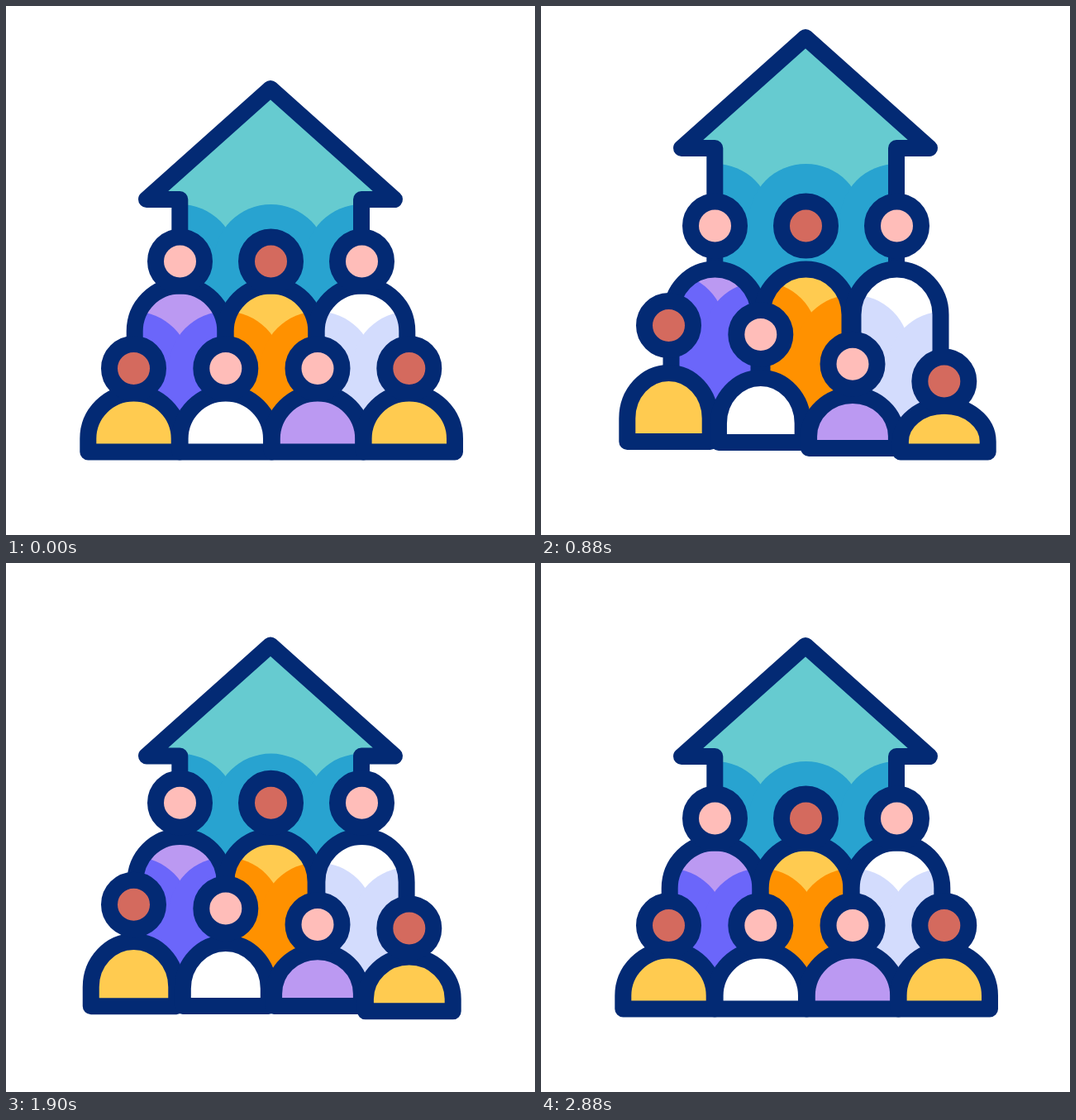
Write an HTML page with a canvas that moves like this. It is 640 by 640 pixels and loops after 3.6 s.

```html
<!DOCTYPE html>
<html lang="en">
<head>
<meta charset="utf-8">
<title>Growing community</title>
<style>
  html, body { margin: 0; width: 100%; height: 100%; overflow: hidden; background: #fff; }
  canvas { display: block; }
</style>
</head>
<body>
<canvas id="stage" width="640" height="640"></canvas>
<script>
const ctx = document.getElementById('stage').getContext('2d');
const LOOP = 3600, STAGGER = 140;
const INK = '#032a74', PINK = '#ffbdb9', BROWN = '#d46a5e', YELLOW = '#ffcb50', LILAC = '#bb99f2';

// Vertical offsets from the resting pose: [time, ...offsets]
const ARROW = [[0, 0], [460, 22], [520, 24], [880, -62], [970, -64], [1200, -57], [1600, 26], [2190, -25.5], [2880, 0]];

// time, head, body top, shade
const BACK = [
  [0, 0, 0, 0], [480, 15.5, 15.3, 12.5], [880, -43, -20, -49], [1040, -48, -22.5, -51], [1200, -45, -21, -45.5],
  [1600, 9, 10.5, -2], [1960, -21, -9, -10], [2220, -1, -0.5, 0], [2520, 0, 0, 0]
];

// time, head, body top, body base, shade
const FRONT = [
  [0, 0, 0, 0, 0], [180, 5, 5, 0, 0], [320, 11, 10.5, 0, 0], [470, 15.6, 15.3, 0, 0],
  [600, -5, 2.5, -4.5, -20], [740, -41, -18.5, -11.5, -36], [880, -52, -24.5, -12.6, -46],
  [1040, -55.5, -25.6, -12.8, -50], [1200, -50, -23, -12, -45], [1320, -36.5, -15.5, -7.5, -35],
  [1460, -0.5, 5.5, 2, -3], [1530, 9, 12, 4, 0], [1600, 1.5, 3.5, -3.5, -6],
  [1800, -23, -9.5, -3.5, -14], [1940, -25.5, -10.5, -3, -14], [2080, -19.5, -6.5, -0.5, -7],
  [2220, 2.5, 4.5, 0, 0], [2460, 0, 0, 0, 0]
];

const backRow = [
  { x: 210.5, skin: PINK, shirt: LILAC, dark: '#6b66fa' },
  { x: 320.5, skin: BROWN, shirt: YELLOW, dark: '#ff9100' },
  { x: 430.5, skin: PINK, shirt: '#fff', dark: '#d3dcfd' }
];
const frontRow = [
  { x: 154.5, skin: BROWN, shirt: YELLOW },
  { x: 265.8, skin: PINK, shirt: '#fff' },
  { x: 377, skin: PINK, shirt: LILAC },
  { x: 487.8, skin: BROWN, shirt: YELLOW }
];

// Monotone cubic interpolation: eases to a stop at every extreme
function sample(keys, time) {
  const last = keys.length - 1;
  const t = Math.max(0, Math.min(time, keys[last][0]));
  let i = 0;
  while (i < last - 1 && t > keys[i + 1][0]) i++;
  const span = keys[i + 1][0] - keys[i][0], u = (t - keys[i][0]) / span;
  return keys[i].slice(1).map((from, n) => {
    const c = n + 1, to = keys[i + 1][c];
    const secant = k => (keys[k + 1][c] - keys[k][c]) / (keys[k + 1][0] - keys[k][0]);
    const slope = k => {
      if (k === 0 || k === last) return 0;
      const a = secant(k - 1), b = secant(k);
      return a * b > 0 ? 2 * a * b / (a + b) : 0;
    };
    const v = 1 - u;
    return v * v * (1 + 2 * u) * from + u * u * (3 - 2 * u) * to
      + span * u * v * (v * slope(i) - u * slope(i + 1));
  });
}

function paint(path, color, outline = path) {
  ctx.fillStyle = color;
  ctx.fill(path);
  ctx.stroke(outline);
}

function drawHead(x, y, skin) {
  const path = new Path2D();
  path.arc(x, y, 29.5, 0, 7);
  paint(path, skin);
}

function bodyPath(x, half, top, base, rise) {
  const path = new Path2D();
  path.moveTo(x - half, base);
  path.ellipse(x, top + rise, half, rise, 0, Math.PI, 2 * Math.PI);
  path.lineTo(x + half, base);
  return path;
}

// Darker tone cast around the row of heads in front
function shade(shape, color, centers) {
  ctx.save();
  ctx.clip(shape);
  ctx.fillStyle = color;
  for (const [x, y] of centers) {
    ctx.beginPath();
    ctx.arc(x, y, 69, Math.PI, 2 * Math.PI);
    ctx.lineTo(x + 69, 640);
    ctx.lineTo(x - 69, 640);
    ctx.fill();
  }
  ctx.restore();
}

function paintShaded(path, light, dark, centers) {
  ctx.fillStyle = light;
  ctx.fill(path);
  shade(path, dark, centers);
  ctx.stroke(path);
}

function draw(t) {
  ctx.fillStyle = '#fff';
  ctx.fillRect(0, 0, 640, 640);
  ctx.strokeStyle = INK;
  ctx.lineWidth = 20;
  ctx.lineJoin = 'round';

  const [lift] = sample(ARROW, t);
  const [head, top, glow] = sample(BACK, t);
  const front = frontRow.map((p, i) => {
    const local = t - i * STAGGER;
    const [head, top, base, glow] = sample(FRONT, local);
    const squeeze = 2.3 * Math.max(0, Math.min(1, local / 460, (2460 - local) / 240));
    return { ...p, head, top, base, glow, half: 55.2 - squeeze - 0.11 * Math.max(0, -top) };
  });

  const eave = 234 + lift;
  const arrow = new Path2D(
    `M210.3 400V${eave}H170L320 ${100 + lift}L470 ${eave}H430V400`);
  paintShaded(arrow, '#66cbd0', '#28a3d0', backRow.map(p => [p.x, 309 + glow]));

  const casters = front.map(p => [p.x, 438.5 + p.glow]);
  for (const p of backRow) {
    const body = bodyPath(p.x, 54.8 - 0.09 * Math.abs(top), 338.5 + top, 505, 55);
    paintShaded(body, p.shirt, p.dark, casters);
  }
  for (const p of backRow) drawHead(p.x, 309 + head, p.skin);

  for (const p of front) {
    const crown = 468.5 + p.top, base = 539.5 + p.base;
    const body = bodyPath(p.x, p.half, crown, base, Math.min(55, (base - crown) * 0.775));
    body.closePath();
    paint(body, p.shirt);
  }
  for (const p of front) drawHead(p.x, 438.5 + p.head, p.skin);
}

const start = performance.now();
function tick() {
  draw((performance.now() - start) % LOOP);
  requestAnimationFrame(tick);
}
tick();
</script>
</body>
</html>
```
